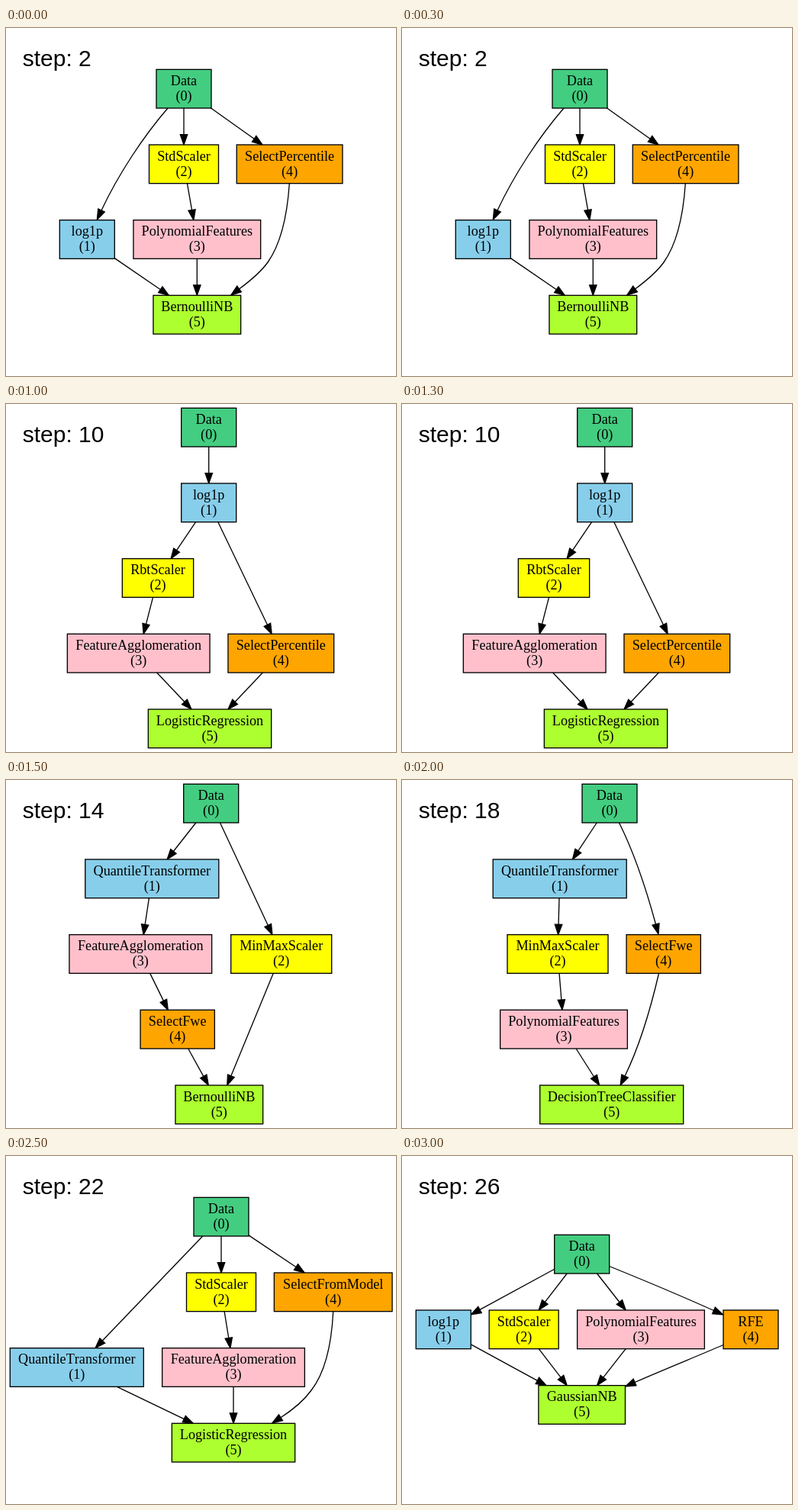
Write an HTML page that moves like this. It is 511 px wide and 456 px high and loops after 3500 ms.

```html
<!DOCTYPE html>
<html lang="en">
<head>
<meta charset="utf-8">
<title>Pipeline graph search</title>
<style>
  html, body { margin: 0; width: 100%; height: 100%; overflow: hidden; background: #fff; }
  svg { display: block; width: 511px; height: 456px; }
  .scene { opacity: 0; }
  .step { font: 30px "Liberation Sans", Arial, sans-serif; font-kerning: none; }
  .node text { font: 18.2px "Liberation Serif", Times, serif; font-kerning: none; text-anchor: middle; }
  .node rect, .edge { stroke: #000; stroke-width: 1.33; }
  .edge { fill: none; marker-end: url(#head); }
</style>
</head>
<body>
<svg id="stage" viewBox="0 0 511 456">
  <defs>
    <marker id="head" markerUnits="userSpaceOnUse" markerWidth="32" markerHeight="24"
            refX="0" refY="0" orient="auto" overflow="visible">
      <path d="M0 -4.67L13.33 0L0 4.67Z" stroke="#000" stroke-width="1.33"/>
    </marker>
  </defs>
</svg>
<script>
const STEP_MS = 500;
const BOX_H = 50.67, ROW_H = 98.67, HEAD = 13.33;
const COLORS = ['#43cd80', '#87ceeb', '#ffff00', '#ffc0cb', '#ffa500', '#adff2f'];

const BOX_W = {
  Data: 72, log1p: 72, RFE: 72, StdScaler: 91, RbtScaler: 93.3, SelectFwe: 97.3,
  GaussianNB: 113.6, BernoulliNB: 114.7, MinMaxScaler: 132, SelectPercentile: 138.7,
  SelectFromModel: 154.7, LogisticRegression: 161.3, PolynomialFeatures: 166.7,
  QuantileTransformer: 175, FeatureAgglomeration: 186.7, DecisionTreeClassifier: 188
};

// Nodes: "label centreX row". Edges: two node indices, run straight. Curves: routed edges.
const SCENES = [
  { top: 54.33,
    nodes: 'Data 233 0,log1p 106.3 2,StdScaler 233 1,PolynomialFeatures 250.3 2,SelectPercentile 371.6 1,BernoulliNB 250.3 3',
    edges: '02 04 23 15 35',
    curves: ['M212 105C180 142 147 192 125 239',
             'M371.3 204C369 238 362 280 343 307C333 321 319 332 305.5 342'] },
  { top: 5.33,
    nodes: 'Data 252.3 0,QuantileTransformer 149.7 2,RbtScaler 324.3 1,FeatureAgglomeration 355 2,RFE 321.7 3,GaussianNB 268.3 4',
    edges: '01 02 23 34 15 45' },
  { top: 5.33,
    nodes: 'Data 265.7 0,log1p 265.7 1,RbtScaler 199 2,FeatureAgglomeration 173.7 3,SelectPercentile 360.3 3,LogisticRegression 267 4',
    edges: '01 12 14 23 35 45' },
  { top: 5.33,
    nodes: 'Data 268.7 0,QuantileTransformer 191.3 1,MinMaxScaler 360.7 2,FeatureAgglomeration 176.3 2,SelectFwe 224.7 3,BernoulliNB 279.3 4',
    edges: '01 02 13 34 45 25' },
  { top: 5.33,
    nodes: 'Data 272 0,QuantileTransformer 206.7 1,MinMaxScaler 204 2,PolynomialFeatures 212 3,SelectFwe 342.7 2,DecisionTreeClassifier 274.7 4',
    edges: '01 12 23 35',
    curves: ['M284.5 56C305 97 320 143 332.5 189',
             'M336.5 253.5C328 290 314 343 292 388'] },
  { top: 54.33,
    nodes: 'Data 282 0,QuantileTransformer 92.8 2,StdScaler 282 1,FeatureAgglomeration 298 2,SelectFromModel 428.7 1,LogisticRegression 298 3',
    edges: '01 02 04 23 15 35',
    curves: ['M428.7 204C427 238 421 280 400 307C390 321 375 333 360 342.7'] },
  { top: 103.33,
    nodes: 'Data 235.7 0,log1p 54.3 1,StdScaler 159.7 1,PolynomialFeatures 313 1,RFE 457 1,GaussianNB 235.7 2',
    edges: '01 02 03 15 25 35',
    curves: ['M271.7 144.5C310 160 365 183 408.5 202.5',
             'M421 247.5C390 261 345 279 305 296.5'] }
];

function add(parent, tag, attrs, text) {
  const el = document.createElementNS('http://www.w3.org/2000/svg', tag);
  for (const key in attrs) el.setAttribute(key, attrs[key]);
  if (text) el.textContent = text;
  return parent.appendChild(el);
}

function parseNodes(scene) {
  return scene.nodes.split(',').map(entry => {
    const [label, x, row] = entry.split(' ');
    return { label, x: +x, y: scene.top + row * ROW_H + BOX_H / 2, w: BOX_W[label] };
  });
}

// Where the line from the centre of a towards the centre of b leaves a's box.
function border(a, b) {
  const dx = b.x - a.x, dy = b.y - a.y;
  const k = Math.min(a.w / 2 / Math.abs(dx), BOX_H / 2 / Math.abs(dy));
  return [a.x + dx * k, a.y + dy * k];
}

function straight(a, b) {
  const [x1, y1] = border(a, b), [x2, y2] = border(b, a);
  const k = 1 - HEAD / Math.hypot(x2 - x1, y2 - y1);
  return `M${x1} ${y1}L${x1 + (x2 - x1) * k} ${y1 + (y2 - y1) * k}`;
}

function drawNode(parent, node, i) {
  const g = add(parent, 'g', { class: 'node' });
  const top = node.y - BOX_H / 2;
  add(g, 'rect', { x: node.x - node.w / 2, y: top, width: node.w, height: BOX_H, fill: COLORS[i] });
  add(g, 'text', { x: node.x, y: top + 20.67 }, node.label);
  add(g, 'text', { x: node.x, y: top + 40.67 }, `(${i})`);
}

const stage = document.getElementById('stage');
const share = 1 / SCENES.length;

SCENES.forEach((scene, i) => {
  const g = add(stage, 'g', { class: 'scene' });
  add(g, 'text', { class: 'step', x: 21.7, y: 50 }, `step: ${2 + 4 * i}`);
  const nodes = parseNodes(scene);
  const lines = scene.edges.split(' ').map(([a, b]) => straight(nodes[a], nodes[b]));
  for (const d of lines.concat(scene.curves || [])) add(g, 'path', { class: 'edge', d });
  nodes.forEach((node, n) => drawNode(g, node, n));

  g.animate([
    { opacity: 1, offset: 0, easing: 'step-end' },
    { opacity: 0, offset: share, easing: 'step-end' },
    { opacity: 0, offset: 1 }
  ], {
    duration: STEP_MS * SCENES.length,
    delay: STEP_MS * (i - SCENES.length),
    iterations: Infinity
  });
});
</script>
</body>
</html>
```
